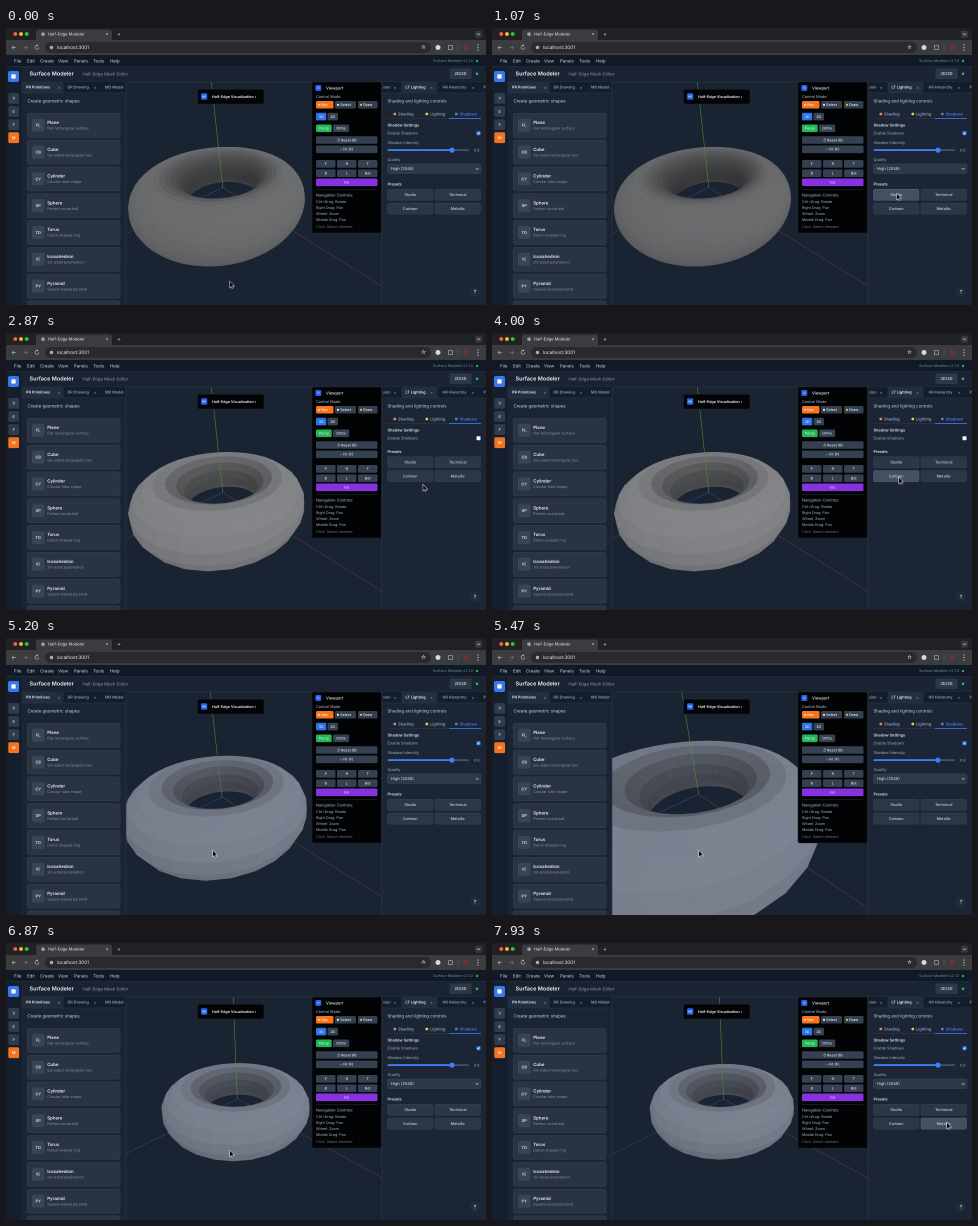
An HTML page with a canvas that plays this animation: 480x277 px, repeating every 8 s.

```html
<!DOCTYPE html>
<html lang="en">
<head>
<meta charset="utf-8">
<title>Half-Edge Modeler</title>
<style>
html, body { margin: 0; width: 100%; height: 100%; overflow: hidden; background: #1a2332; }
canvas { display: block; width: 480px; height: 277px; }
</style>
</head>
<body>
<canvas id="stage"></canvas>
<script>
const canvas = document.getElementById('stage');
const g = canvas.getContext('2d');
const scale = 2 * (window.devicePixelRatio || 1); // supersampled for clean small text
canvas.width = 480 * scale;
canvas.height = 277 * scale;
g.textRendering = 'geometricPrecision';

const LOOP = 8000, FOCAL = 145, CENTER = [240, 165.5], LIGHT = [0.3, 0.87, -0.39];
const TECHNICAL_AT = 2330, METALLIC_AT = 4300;

// time, x, y
const cursorKeys = [
  [0, 225, 256], [70, 225, 256], [530, 404, 168], [1000, 405, 168], [1700, 437, 169],
  [2400, 439, 168], [3200, 406, 146], [4000, 408, 147], [4230, 450, 144], [4400, 450, 144],
  [5000, 208, 215], [5600, 208, 215], [6500, 224.5, 210], [6930, 225, 210],
  [7730, 455, 181], [7930, 456, 182]
];
// time, x, y and depth of the scene origin, pitch, yaw in degrees
const cameraKeys = [
  [0, -.42, .11, 2.63, 35, 45], [5000, -.42, .11, 2.63, 35, 45], [5200, -.42, .11, 2.54, 35, 45],
  [5470, -.43, .12, 1.87, 37, 45], [6070, -.29, .18, 1.87, 33, 49], [6530, -.18, .22, 1.9, 31, 46],
  [6900, -.18, .2, 3.02, 35, 45], [7100, -.18, .2, 3.07, 35, 45]
];
const materials = {
  wire: { rgb: [104, 105, 107], u: 64, v: 32, mesh: true },
  smooth: { rgb: [104, 105, 107], u: 80, v: 40 },
  flat: { rgb: [127, 129, 132], u: 32, v: 16 },
  metal: { rgb: [120, 126, 140], u: 32, v: 16 }
};

function sample(keys, t) {
  const i = keys.findIndex(k => k[0] > t);
  if (i < 0) return keys[keys.length - 1].slice(1);
  const a = keys[i - 1], b = keys[i];
  let p = (t - a[0]) / (b[0] - a[0]);
  p = p * p * (3 - 2 * p);
  return a.slice(1).map((v, n) => v + (b[n + 1] - v) * p);
}

function text(s, x, y, size = 4, color = '#d5dbe5', weight = 400, align = 'left') {
  g.font = `${weight} ${size}px Inter, sans-serif`;
  g.textAlign = align;
  g.textBaseline = 'middle';
  g.fillStyle = color;
  g.fillText(s, x, y);
}
function box(x, y, w, h, color, r = 0, border) {
  g.beginPath();
  g.roundRect(x, y, w, h, r);
  g.fillStyle = color;
  g.fill();
  if (border) { g.strokeStyle = border; g.lineWidth = .5; g.stroke(); }
}
function dot(x, y, r, color) {
  g.beginPath();
  g.arc(x, y, r, 0, 7);
  g.fillStyle = color;
  g.fill();
}
function line(points, color, width = .6) {
  g.beginPath();
  points.forEach(p => g.lineTo(...p));
  g.strokeStyle = color;
  g.lineWidth = width;
  g.stroke();
}
function button(label, x, y, w, h, color = '#354151', size = 3.6, ink = '#e2e7ee') {
  box(x, y, w, h, color, 1.3);
  text(label, x + w / 2, y + h / 2 + .2, size, ink, 500, 'center');
}

function makeProjector([tx, ty, tz, pitch, yaw]) {
  const rad = Math.PI / 180;
  const sp = Math.sin(pitch * rad), cp = Math.cos(pitch * rad);
  const sy = Math.sin(yaw * rad), cy = Math.cos(yaw * rad);
  const turn = ([x, y, z]) => [x * cy - z * sy, y, -x * sy - z * cy];
  const project = point => {
    const [x, y, z] = turn(point);
    const depth = tz + z * cp - y * sp;
    return [CENTER[0] + FOCAL * (tx + x) / depth,
            CENTER[1] - FOCAL * (ty + y * cp + z * sp) / depth, depth];
  };
  return { project, turn };
}

function drawTorus({ project, turn }, { rgb, u, v, mesh }) {
  const at = (i, j) => {
    const a = i / u * 2 * Math.PI, b = j / v * 2 * Math.PI, r = 1 + .4 * Math.cos(b);
    return project([r * Math.cos(a), .4 * Math.sin(b), r * Math.sin(a)]);
  };
  const faces = [];
  for (let i = 0; i < u; i++) for (let j = 0; j < v; j++) {
    const q = [at(i, j), at(i, j + 1), at(i + 1, j + 1), at(i + 1, j)];
    const cross = (q[2][0] - q[0][0]) * (q[3][1] - q[1][1]) - (q[2][1] - q[0][1]) * (q[3][0] - q[1][0]);
    if (cross > 0) continue; // faces away from the viewer
    const a = (i + .5) / u * 2 * Math.PI, b = (j + .5) / v * 2 * Math.PI;
    const n = turn([Math.cos(b) * Math.cos(a), Math.sin(b), Math.cos(b) * Math.sin(a)]);
    const diffuse = Math.max(0, n[0] * LIGHT[0] + n[1] * LIGHT[1] + n[2] * LIGHT[2]);
    const shade = (.84 + .2 * diffuse) * (1 - .38 * Math.max(0, -Math.cos(b)));
    faces.push({ q, shade, depth: q.reduce((s, p) => s + p[2], 0) });
  }
  faces.sort((a, b) => b.depth - a.depth);
  g.lineWidth = .35;
  for (const { q, shade } of faces) {
    const tint = k => `rgb(${rgb.map(c => Math.round(c * shade * k))})`;
    g.beginPath();
    q.forEach(p => g.lineTo(p[0], p[1]));
    g.closePath();
    g.fillStyle = tint(1);
    g.fill();
    g.strokeStyle = tint(mesh ? 1.1 : 1);
    g.stroke();
  }
}

function drawScene(t) {
  const camera = sample(cameraKeys, t);
  const projector = makeProjector(camera);
  const axis = (dir, from, to, color) =>
    line([from, to].map(s => projector.project(dir.map(d => d * s)).slice(0, 2)), color, .55);
  const reach = Math.min(5, (camera[2] - .25) / .65); // stays in front of the camera
  const material = t < 1000 ? 'wire' : t < TECHNICAL_AT ? 'smooth' : t < METALLIC_AT ? 'flat' : 'metal';
  const X = [1, 0, 0], Y = [0, 1, 0], Z = [0, 0, 1];
  g.save();
  g.beginPath();
  g.rect(120, 54, 256, 223);
  g.clip();
  box(120, 54, 256, 223, '#1a2332');
  axis(X, 0, .7, '#71394a');
  axis(Z, 0, .7, '#294a91');
  drawTorus(projector, materials[material]);
  axis(X, 1.4, reach, '#653440');
  axis(Z, 1.4, reach, '#29477e');
  axis(Y, 0, reach, '#4f8f35');
  g.restore();
}

function drawBrowser() {
  box(0, 0, 480, 12, '#202124');
  ['#ff5f57', '#febc2e', '#28c840'].forEach((c, i) => dot(9.3 + i * 5.7, 6, 1.9, c));
  box(30, 1.5, 76, 12, '#3b3c3f', 2.5);
  dot(37, 6.2, 1.8, '#9aa0a6');
  text('Half-Edge Modeler', 42, 6.3, 4.1, '#e8eaed');
  text('×', 101, 6.2, 5, '#c8cacc', 400, 'center');
  text('+', 113, 6.2, 6, '#c8cacc', 400, 'center');
  box(469, 2.8, 7, 7, '#37383b', 1.8);
  line([[471, 5.5], [472.5, 7], [474, 5.5]], '#c8cacc');
  box(0, 12, 480, 15, '#3b3c3f');
  text('←', 8, 19.5, 6, '#d6d8da', 400, 'center');
  text('→', 19.5, 19.5, 6, '#85888b', 400, 'center');
  text('↻', 31, 19.5, 6, '#d6d8da', 400, 'center');
  box(39, 14, 386, 11, '#282a2d', 5.5);
  dot(45.5, 19.5, 1.7, '#a9adb1');
  text('localhost:3001', 51, 19.7, 4.7, '#eceef0');
  text('☆', 417.5, 19.3, 5.5, '#c8cacc', 400, 'center');
  dot(432, 19.5, 2.5, '#d6d8da');
  box(442.3, 17.4, 4.3, 4.3, '#3b3c3f', .8, '#d6d8da');
  line([[452, 16], [452, 23]], '#696b6e', .4);
  dot(460, 19.5, 2.8, '#6b3238');
  [17, 19.5, 22].forEach(y => dot(472, y, .6, '#d6d8da'));
}

function drawHeader() {
  box(0, 27, 480, 11.5, '#111927');
  [['File', 8], ['Edit', 21], ['Create', 34], ['View', 52], ['Panels', 68], ['Tools', 87], ['Help', 104]]
    .forEach(([s, x]) => text(s, x, 33, 4.4, '#d1d7e0'));
  text('Surface Modeler v2.1.0', 467, 33, 3.7, '#5d9188', 400, 'right');
  dot(471, 33, 1.2, '#22b35e');
  box(0, 38.5, 480, 15.5, '#1a2332');
  text('Surface Modeler', 23.5, 46, 5.5, '#f1f4f8', 600);
  text('Half-Edge Mesh Editor', 76.5, 46.2, 4.3, '#8b97a9');
  button('2D/3D', 443.5, 40.5, 22, 10.5, '#2c3747', 4);
  dot(471, 45.8, 1.3, '#22c55e');
  line([[0, 38.5], [480, 38.5]], '#293445', .5);
  line([[15, 54], [480, 54]], '#2d3849', .5);
}

function drawLeftPanel() {
  box(0, 39, 15.5, 238, '#151e2c');
  box(2, 43, 11, 11, '#3878ee', 2);
  box(5.3, 46.2, 4.4, 4.4, '#f4f7fc', .8);
  ['V', 'E', 'F', 'M'].forEach((s, i) => {
    const active = s === 'M';
    box(2.3, 65 + i * 13.1, 10.8, 10.8, active ? '#f4731f' : '#303b4b', 1.6);
    text(s, 7.7, 70.6 + i * 13.1, 3.8, active ? '#fff' : '#cbd2dc', 600, 'center');
  });
  box(15.5, 54, 104.5, 223, '#1b2433');
  box(15.5, 54, 104.5, 11, '#141d2b');
  box(15.5, 54, 42, 11, '#222d3e');
  text('PR Primitives', 20, 59.5, 3.8, '#f0f3f7', 600);
  text('×', 53, 59.5, 4.2, '#929eae', 400, 'center');
  text('DR Drawing', 61.5, 59.5, 3.8, '#a9b3c1', 500);
  text('×', 89, 59.5, 4.2, '#929eae', 400, 'center');
  text('MD Model', 99, 59.5, 3.8, '#a9b3c1', 500);
  line([[15.5, 65], [120, 65]], '#2d3849', .5);
  text('Create geometric shapes', 21.5, 73, 4.4, '#cbd3de');
  [['FL', 'Plane', 'Flat rectangular surface'], ['CB', 'Cube', 'Six-sided rectangular box'],
   ['CY', 'Cylinder', 'Circular tube shape'], ['SP', 'Sphere', 'Perfect round ball'],
   ['TO', 'Torus', 'Donut-shaped ring'], ['IC', 'Icosahedron', '20-sided polyhedron'],
   ['PY', 'Pyramid', 'Square-based pyramid'], ['', '', '']].forEach(([code, name, note], i) => {
    const y = 97.3 + i * 26.8;
    box(21.3, y - 12, 92.7, 24, '#293342', 2, '#384352');
    box(26, y - 6.5, 12.5, 13, '#3a4554', 2);
    text(code, 32.2, y + .2, 3.9, '#e2e7ee', 600, 'center');
    text(name, 41.2, y - 2.6, 4.4, '#edf0f5', 600);
    text(note, 41.2, y + 3.1, 3.7, '#8693a5');
  });
  line([[120, 54], [120, 277]], '#303b4c', .6);
}

function drawOverlays() {
  box(191.5, 61.3, 66.5, 14.7, '#030406', 1.8, '#20262f');
  box(195, 65.3, 6.3, 6.5, '#2563eb', 1.2);
  text('HE', 198.1, 68.7, 2.8, '#fff', 600, 'center');
  text('Half-Edge Visualization ›', 206, 68.8, 3.7, '#f1f3f5', 600);

  box(306, 54, 69.5, 151, '#020305', 1.5, '#20262f');
  box(309.3, 57, 6, 6, '#2563eb', 1.2);
  text('⊙', 312.3, 60.1, 3.5, '#fff', 400, 'center');
  text('Viewport', 320, 60.2, 4, '#f1f3f5', 500);
  text('Control Mode', 310, 69, 3.8, '#b9c0ca');
  const mode = (label, x, w, color, mark) => {
    box(x, 73, w, 7.5, color, 1.3);
    dot(x + 3, 76.8, 1.1, mark);
    text(label, x + 5.3, 77, 3.6, '#f0f2f5', 500);
  };
  mode('Nav', 310, 17.5, '#f9731a', '#ffd3a8');
  mode('Select', 329, 21, '#344050', '#e8edf3');
  mode('Draw', 352, 19.5, '#344050', '#f1bd45');
  button('3D', 310, 84.8, 10.3, 7.6, '#2f73ec');
  button('2D', 321.5, 84.8, 10.5, 7.6);
  button('Persp', 310, 96.5, 15.7, 7.6, '#1fb855');
  button('Ortho', 327, 96.5, 16.2, 7.6);
  button('↺ Reset (R)', 310, 108.2, 61.5, 7.6);
  button('⌕ Fit (F)', 310, 117.5, 61.5, 7.6);
  ['F', 'R', 'T', 'B', 'L', 'Bot'].forEach((s, i) =>
    button(s, 310 + i % 3 * 21, 132 + Math.floor(i / 3) * 9.4, 19.5, 7.7));
  button('Iso', 310, 150.5, 61.5, 7.6, '#8732df');
  line([[310, 161.8], [371.5, 161.8]], '#2d343e', .5);
  text('Navigation Controls:', 310, 167.3, 3.9, '#b8c0cb');
  ['Ctrl+Drag: Rotate', 'Right Drag: Pan', 'Wheel: Zoom', 'Middle Drag: Pan']
    .forEach((s, i) => text(s, 310, 174 + i * 5.9, 3.7, '#a5aebb'));
  text('Click: Select element', 310, 199, 3.7, '#69727f');
}

function drawRightPanel(t, cursor) {
  const shadows = t < TECHNICAL_AT || t >= METALLIC_AT;
  box(376, 54, 104, 223, '#1b2535');
  box(376, 54, 104, 11, '#141d2b');
  box(395.5, 54, 36, 11, '#222d3e');
  text('sion', 377, 59.5, 3.8, '#a9b3c1', 500);
  text('LT Lighting', 399.5, 59.5, 3.8, '#f0f3f7', 600);
  text('HR Hierarchy', 436.5, 59.5, 3.8, '#a9b3c1', 500);
  text('P', 477.5, 59.5, 3.8, '#a9b3c1', 500);
  [389, 425.5, 467].forEach(x => text('×', x, 59.5, 4.2, '#929eae', 400, 'center'));
  line([[376, 65], [480, 65]], '#2d3849', .5);
  line([[376, 54], [376, 277]], '#303b4c', .6);
  text('Shading and lighting controls', 381.5, 73, 4.3, '#cbd3de');
  [['Shading', 392, '#e88b49'], ['Lighting', 424, '#f2cd52'], ['Shadows', 453.5, '#6b7d98']].forEach(([s, x, c], i) => {
    dot(x - 3.2, 86, 1.4, c);
    text(s, x, 86.2, 4, i === 2 ? '#4c8df5' : '#a3aebd', 500);
  });
  line([[381, 90.7], [475, 90.7]], '#303c4d', .5);
  line([[443, 90.5], [475, 90.5]], '#3b82f6', .8);
  text('Shadow Settings', 381.5, 97.3, 3.9, '#e2e7ee', 600);
  text('Enable Shadows', 381.5, 105.2, 3.9, '#a3aebd');
  box(470.5, 103.2, 4, 4, shadows ? '#3b82f6' : '#f5f6f8', .7);
  if (shadows) {
    line([[471.4, 105.2], [472.2, 106.1], [473.7, 104.3]], '#fff', .6);
    text('Shadow Intensity', 381.5, 114.8, 3.9, '#a3aebd');
    box(381.5, 121.2, 81.5, 1.8, '#465264', .9);
    box(381.5, 121.2, 64.5, 1.8, '#3b82f6', .9);
    dot(446, 122.1, 2.6, '#3b82f6');
    text('0.8', 468, 122.3, 3.7, '#a3aebd');
    text('Quality', 381.5, 131.8, 3.9, '#a3aebd');
    box(381.5, 136, 93.5, 9.5, '#2d3848', 1.4, '#3b4757');
    text('High (2048)', 385, 141, 4, '#e0e5ec');
    line([[469.8, 140.1], [471.2, 141.6], [472.6, 140.1]], '#c5ccd6');
  }
  const top = shadows ? 161.3 : 123.8;
  text('Presets', 381.5, top - 5.2, 3.9, '#e2e7ee', 600);
  ['Studio', 'Technical', 'Cartoon', 'Metallic'].forEach((s, i) => {
    const x = 381.5 + i % 2 * 47.5, y = top + Math.floor(i / 2) * 13.8;
    const hover = cursor[0] > x && cursor[0] < x + 45.5 && cursor[1] > y && cursor[1] < y + 11;
    box(x, y, 45.5, 11, hover ? '#445061' : '#2b3646', 1.5, hover ? '#5b6777' : '#374353');
    text(s, x + 22.7, y + 5.7, 3.8, '#cbd3de', 500, 'center');
  });
  dot(469, 264, 5.3, '#202b3b');
  text('?', 469, 264.2, 5, '#d5dbe5', 600, 'center');
}

function drawCursor([x, y]) {
  g.save();
  g.translate(x - 1, y - 2.2);
  g.beginPath();
  [[0, 0], [0, 5.6], [1.3, 4.4], [2.1, 6.3], [3, 5.9], [2.2, 4.1], [3.9, 4]].forEach(p => g.lineTo(...p));
  g.closePath();
  g.fillStyle = '#08090b';
  g.strokeStyle = '#f5f5f5';
  g.lineWidth = .9;
  g.stroke();
  g.fill();
  g.restore();
}

function frame() {
  const t = performance.now() % LOOP;
  const cursor = sample(cursorKeys, t);
  g.setTransform(scale, 0, 0, scale, 0, 0);
  drawScene(t);
  drawBrowser();
  drawHeader();
  drawLeftPanel();
  drawOverlays();
  drawRightPanel(t, cursor);
  drawCursor(cursor);
  requestAnimationFrame(frame);
}
frame();
</script>
</body>
</html>
```
